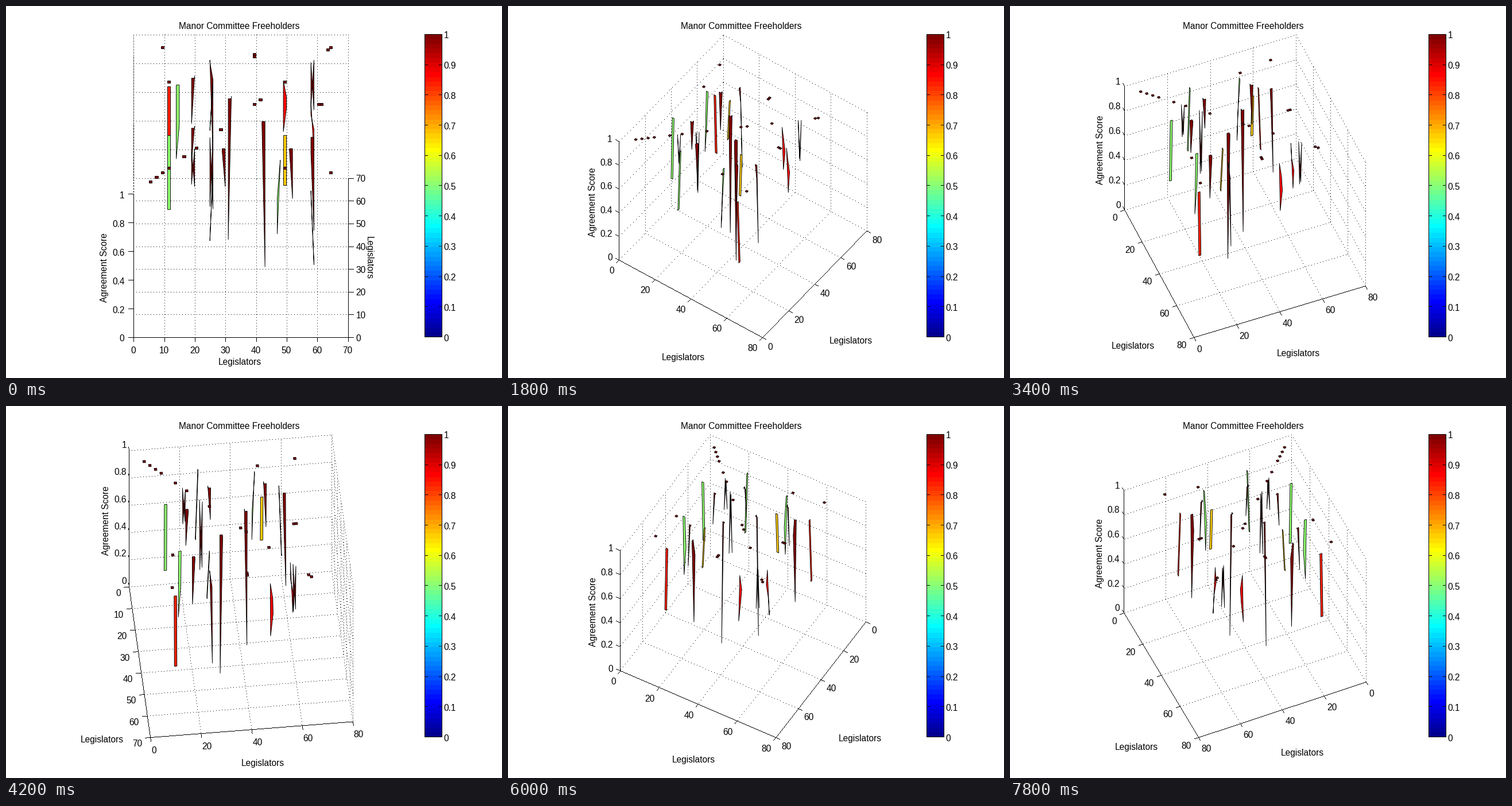
A matplotlib script that plays this animation: 864 px wide and 648 px high, repeating every 8 s.

```python
import numpy as np
import matplotlib.pyplot as plt
from matplotlib.animation import FuncAnimation
from matplotlib.collections import PolyCollection

W, H, DPI = 864, 648, 100
PX = 72 / DPI
FRAMES, STEP_MS, TURN = 40, 200, 4
CENTER, HEIGHT = np.array([408, 313.5]), 527
SIN_EL, COS_EL = np.sin(np.radians(48)), np.cos(np.radians(48))

plt.rcParams['font.family'] = 'Liberation Sans'
plt.rcParams['font.size'] = 15.5 * PX

fig = plt.figure(figsize=(W / DPI, H / DPI), dpi=DPI, facecolor='white')
ax = fig.add_axes([0, 0, 1, 1])
ax.set_xlim(-0.5, W - 0.5)
ax.set_ylim(H - 0.5, -0.5)
ax.axis('off')


def jet(v):
    v = (min(int(v * 64), 63) + 1) / 64
    return tuple(np.clip(1.5 - abs(4 * v - k), 0, 1) for k in (3, 2, 1))


# Corner heights run (x,y), (x+1,y), (x+1,y+1), (x,y+1)
def step(x, y, low, high=1):
    return x, y, low, low, high, high


def spike(x, y, low, bend=1):
    return x, y, 1, bend, 1, low


def build_faces():
    single = [(k, k, 1, low, 1, low) for k, low in ((19, .75), (25, .5), (58, 2 / 3))]
    single += [step(k, k, 1) for k in (5, 7, 9, 11, 16, 20, 28, 39, 41, 49, 63, 64)]
    paired = [step(11, 25, 1 / 2), step(49, 25, 2 / 3), step(11, 58, 5 / 6, 1 / 3),
              spike(19, 51, 2 / 3), spike(19, 29, 3 / 4), spike(31, 42, 0),
              (14, 47, .5, .735, 1, 1), (25, 58, 1, .88, .333, 1),
              (49, 58, .87, .76, .66, .5)]
    paired += [step(x, y, 1) for x, y in ((9, 64), (11, 49), (39, 60), (39, 61))]
    mirrored = [(y, x, a, d, c, b) for x, y, a, b, c, d in paired]
    corners = [(0, 0), (1, 0), (1, 1), (0, 1)]
    return np.array([[(x + i, y + j, z) for (i, j), z in zip(corners, zs)]
                     for x, y, *zs in single + paired + mirrored])


FACES = build_faces()
COLORS = [jet(f[0, 2]) for f in FACES]


def tick_step(angle):
    """Spacing of ticks for an axis turned this far from the screen plane."""
    return 10 if angle < 3 or 39 < angle < 51 or angle > 69 else 20


def title_offset(a, side):
    if side < 0:
        return 12 - .5 * a - .005 * a * a, 65 + 1.15 * a - .004 * a * a
    return 16 + .75 * a + .0024 * a * a, 51 + a - .0028 * a * a


def pixel_lines(segments, gap=1, zorder=4):
    """One-pixel lines; a gap above 1 makes them dotted."""
    pts = []
    for p, q in np.asarray(segments, float):
        n = max(np.abs(q - p).max(), 1)
        t = np.arange(0, n + .5, gap)[:, None] / n
        pts.append(np.round(p + (q - p) * t))
    pts = np.vstack(pts)
    return ax.plot(pts[:, 0], pts[:, 1], ',', color='k', zorder=zorder)


parts = []


def put(p, s, **kw):
    kw = {'ha': 'center', 'va': 'center_baseline', **kw}
    parts.append(ax.text(p[0], p[1], s, **kw))


def draw_faces(at, limits, toward):
    f = FACES / (*limits, 1)
    order = np.argsort(f.mean(axis=1) @ toward, kind='stable')
    parts.append(ax.add_collection(PolyCollection(
        [[at(*p) for p in f[k]] for k in order],
        facecolors=[COLORS[k] for k in order], edgecolors='k',
        linewidths=.9 * PX, joinstyle='bevel', zorder=3), autolim=False))


def draw(i):
    while parts:
        parts.pop().remove()
    az = np.radians(TURN * i)
    c, s = np.cos(az), np.sin(az)
    size = HEIGHT / ((abs(c) + abs(s)) * SIN_EL + COS_EL)
    ex = size * np.array([c, s * SIN_EL])
    ey = size * np.array([s, -c * SIN_EL])
    ez = size * np.array([0, -COS_EL])

    def at(x, y, z):
        return CENTER + (x - .5) * ex + (y - .5) * ey + (z - .5) * ez

    turn = np.degrees(np.arctan2(abs(s), abs(c)))
    angles = turn, 90 - turn
    steps = [tick_step(a) for a in angles]
    limits = [70 if k == 10 else 80 for k in steps]
    xt, yt = [np.arange(0, m + 1, k) for m, k in zip(limits, steps)]
    zt = np.arange(6) / 5
    near = 0 if c > 0 else 1
    far = 1 - near

    # Dotted floor and back walls
    grid = []
    for u in xt / limits[0]:
        grid += [(at(u, 0, 0), at(u, 1, 0)), (at(u, far, 0), at(u, far, 1))]
    for v in yt / limits[1]:
        grid += [(at(0, v, 0), at(1, v, 0)), (at(0, v, 0), at(0, v, 1))]
    for w in zt:
        grid += [(at(0, far, w), at(1, far, w)), (at(0, 0, w), at(0, 1, w))]
    parts.extend(pixel_lines(grid, gap=5, zorder=1))

    draw_faces(at, limits, np.array([s * COS_EL, -c * COS_EL, SIN_EL]))

    # The two floor axes that face the viewer
    x_axis = (lambda u: at(u, near, 0)), xt, (ey if near else -ey), angles[0]
    y_axis = (lambda v: at(1, v, 0)), yt, ex, angles[1]
    left, right = (y_axis, x_axis) if near else (x_axis, y_axis)
    lines = []
    for (pos, ticks, out, angle), side in ((left, -1), (right, 1)):
        tick = .025 * out
        lines.append((pos(0), pos(1)))
        for t in ticks:
            p = pos(t / ticks[-1])
            lines.append((p, p + tick))
            level, upright = np.abs(tick[::-1]) < .01
            ha = 'center' if upright else 'right' if side < 0 else 'left'
            dx = 0 if upright else .45 * tick[0] + side
            dy = 0 if level else 8.5 + .93 * tick[1]
            put(p + tick + (dx, dy), str(t), ha=ha)
        if turn > 0:
            put(pos(.5) + title_offset(angle, side), 'Legislators')
        elif side < 0:
            put(pos(.5) + (-1.5, 41), 'Legislators')
        else:
            put(pos(.5) + (37, 0), 'Legislators', rotation=270, va='center')

    # Height axis on the left corner
    tick = -.025 * (ey if near else ex)
    lines.append((at(near, 0, 0), at(near, 0, 1)))
    for w in zt:
        p = at(near, 0, w)
        lines.append((p, p + tick))
        put(p + tick + (.45 * tick[0] - 2, .9 * tick[1] + 1), f'{w:g}', ha='right')
    put(at(near, 0, .5) + (.13 * left[3] - 50, 2.5), 'Agreement Score',
        rotation=90, va='center')
    parts.extend(pixel_lines(lines))
    return parts


def colorbar(x0=728, x1=758, top=49, bottom=576):
    h = (bottom - top) / 64
    for k in range(64):
        ax.add_patch(plt.Rectangle((x0, bottom - (k + 1) * h), x1 - x0, h,
                                   fc=jet(k / 64), lw=0, antialiased=False))
    lines = [((x0, top), (x1, top)), ((x0, bottom), (x1, bottom)),
             ((x0, top), (x0, bottom)), ((x1, top), (x1, bottom))]
    for k in range(11):
        y = bottom - k * (bottom - top) / 10
        lines += [((x0, y), (x0 + 5, y)), ((x1 - 5, y), (x1, y))]
        ax.text(x1 + 4, y + 1, f'{k / 10:g}', ha='left', va='center_baseline')
    pixel_lines(lines)


colorbar()
ax.text(406, 33, 'Manor Committee Freeholders', ha='center', va='center_baseline')

anim = FuncAnimation(fig, draw, frames=FRAMES, init_func=lambda: draw(0),
                     interval=STEP_MS, repeat=True, repeat_delay=0, blit=False)
plt.show()
```
